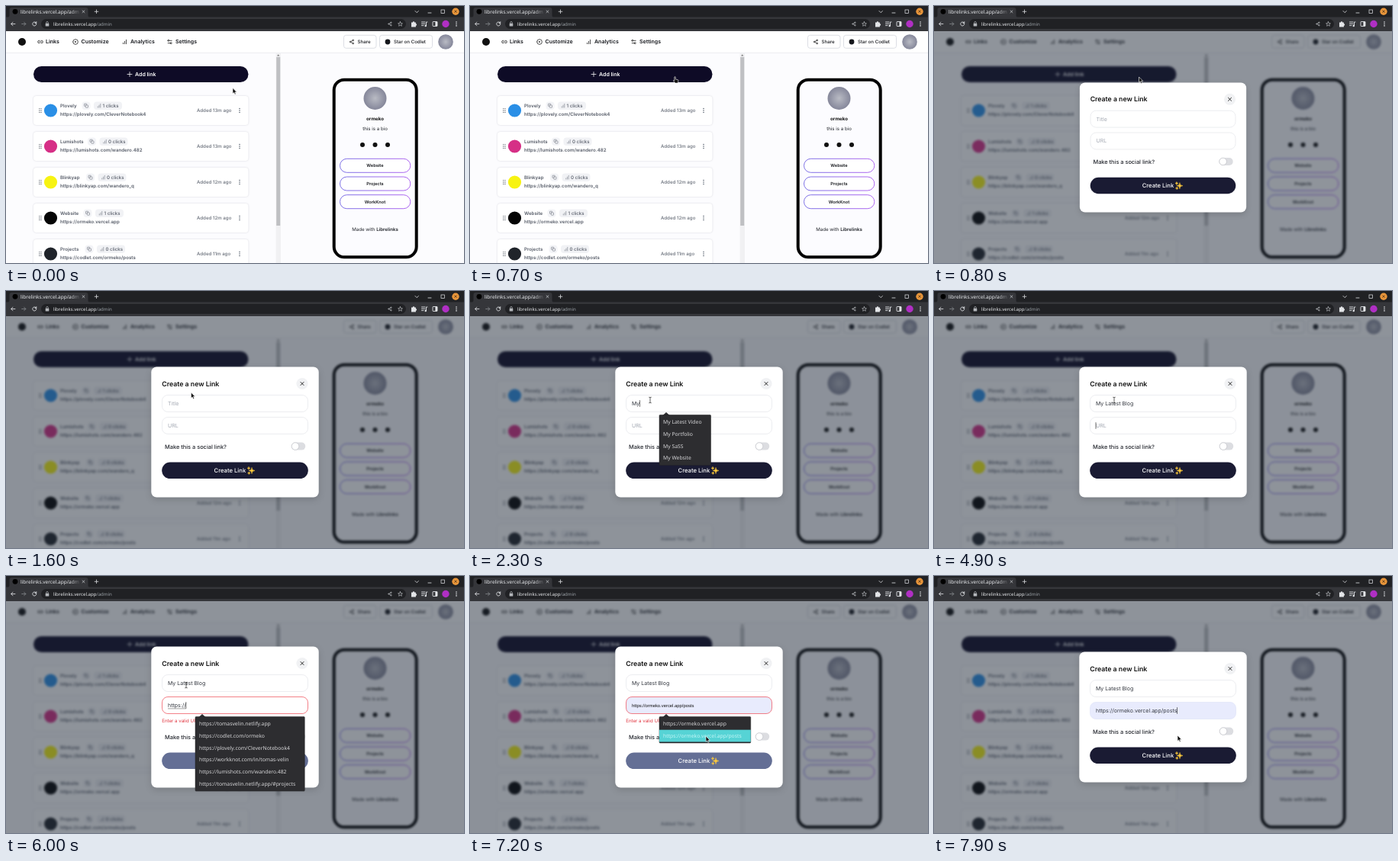
Write an HTML page that moves like this. It is 600 px wide and 337 px high and loops after 8 s.

```html
<!DOCTYPE html>
<html lang="en">
<head>
<meta charset="utf-8">
<title>Link manager</title>
<style>
  html, body { margin: 0; height: 100%; overflow: hidden; background: #fcfcfe; }
  svg { display: block; width: 100vw; height: 100vh; }
  text { font-family: Inter, sans-serif; white-space: pre; text-rendering: geometricPrecision; }
  .ui { font-family: "Noto Sans", sans-serif; }
  .sys { font-family: "Liberation Sans", sans-serif; }
  .card { filter: drop-shadow(0 .6px 1.2px rgba(20, 20, 50, .16)); }
  .panel { filter: drop-shadow(0 3px 4px rgba(0, 0, 0, .14)); }
  .blurred { filter: blur(1.75px); }
</style>
</head>
<body>
<svg viewBox="0 0 600 337" preserveAspectRatio="none">
  <defs>
    <clipPath id="view"><rect y="33" width="600" height="304"/></clipPath>
    <linearGradient id="violet"><stop stop-color="#6f62e2"/><stop offset="1" stop-color="#a657ee"/></linearGradient>
    <linearGradient id="fade" gradientUnits="userSpaceOnUse" x1="84" x2="97">
      <stop stop-color="#e8eaed"/><stop offset="1" stop-color="#e8eaed" stop-opacity=".15"/>
    </linearGradient>
    <radialGradient id="face"><stop stop-color="#b9bbc4"/><stop offset="1" stop-color="#85879a"/></radialGradient>
  </defs>
  <g clip-path="url(#view)">
    <g id="page"></g>
    <rect id="shade" y="33" width="600" height="304" fill="#1f2937"/>
    <g id="modal"></g>
  </g>
  <g id="browser"></g>
  <g id="pointer"></g>
</svg>
<script>
const LOOP = 8000, STEP = 100;
const $ = id => document.getElementById(id);

// Drawing helpers; text is placed by its vertical centre
const rect = (x, y, w, h, r, fill, extra = '') =>
  `<rect x="${x}" y="${y}" width="${w}" height="${h}" rx="${r}" fill="${fill}" ${extra}/>`;
const disc = (x, y, r, fill, extra = '') =>
  `<circle cx="${x}" cy="${y}" r="${r}" fill="${fill}" ${extra}/>`;
const text = (x, cy, size, str, fill, weight = 400, extra = '') =>
  `<text x="${x}" y="${cy + size * .355}" font-size="${size}" font-weight="${weight}" fill="${fill}" ${extra}>${str}</text>`;
const mid = 'text-anchor="middle"';
const line = (d, color, width = .8) =>
  `<path d="${d}" fill="none" stroke="${color}" stroke-width="${width}" stroke-linecap="round" stroke-linejoin="round"/>`;
const icon = (d, cx, cy, size, color = '#111', width = 2) =>
  `<g transform="translate(${cx - size / 2} ${cy - size / 2}) scale(${size / 24})">${line(d, color, width)}</g>`;
const ring = (x, y, r) => `M${x - r} ${y}a${r} ${r} 0 1 0 ${2 * r} 0a${r} ${r} 0 1 0 ${-2 * r} 0`;

const ICON = {
  link: 'M9 17H7A5 5 0 0 1 7 7h2M15 7h2a5 5 0 0 1 0 10h-2M8 12h8',
  target: ring(12, 12, 10) + ring(12, 12, 2),
  bars: 'M12 20V10M18 20V4M6 20v-4',
  sliders: 'M20 7h-9M14 17H5' + ring(17, 17, 3) + ring(7, 7, 3),
  share: ring(18, 5, 3) + ring(6, 12, 3) + ring(18, 19, 3) + 'M8.6 13.5l6.8 4M15.4 6.5l-6.8 4',
  copy: 'M11 9h9a2 2 0 0 1 2 2v9a2 2 0 0 1-2 2h-9a2 2 0 0 1-2-2v-9a2 2 0 0 1 2-2zM5 15H4a2 2 0 0 1-2-2V4a2 2 0 0 1 2-2h9a2 2 0 0 1 2 2v1',
  plus: 'M12 4v16M4 12h16',
  cross: 'M5 5l14 14M19 5L5 19',
  star: 'M12 2l3 7 7 .6-5.3 4.7 1.6 7.2L12 17.6 5.7 21.5l1.6-7.2L2 9.6 9 9z',
  back: 'M21 12H4M11 4l-8 8 8 8',
  next: 'M3 12h17M13 4l8 8-8 8',
  reload: 'M20 12a8 8 0 1 1-2.5-5.8L20 8.5M20 3v5.5h-5.5'
};

const pen = document.createElement('canvas').getContext('2d');
function measure(str, size, font) {
  pen.font = `100px ${font}, sans-serif`;
  return pen.measureText(str).width * size / 100;
}

function drawBrowser() {
  const pale = '#e3e5e8', dim = '#85888c', y = 23.5;
  return rect(0, 0, 600, 15, 0, '#202124') + rect(0, 14.5, 600, 18.5, 0, '#35363a') +
    '<path d="M2 15q2.500 0 2.500-3V5q0-3 3-3h97q3 0 3 3v7q0 3 2.500 3z" fill="#35363a"/>' +
    disc(12, 7.3, 3.4, '#000') +
    text(19, 7.2, 6.5, 'librelinks.vercel.app/adm', 'url(#fade)', 400, 'class="ui"') +
    icon(ICON.cross, 101.5, 7.3, 5, pale, 3) + icon(ICON.plus, 118.5, 7.3, 7, pale, 2.6) +
    line('M536 6.5l2.2 2.2 2.2-2.2M553 9h4', pale) +
    rect(570, 5, 4.4, 4.4, 0, 'none', `stroke="${pale}" stroke-width=".7"`) +
    disc(589, 7.2, 4.7, '#e8953a') + icon(ICON.cross, 589, 7.2, 4.4, '#3b2a16', 4) +
    icon(ICON.back, 9.3, y, 7, pale, 2.8) + icon(ICON.next, 23.3, y, 7, dim, 2.8) +
    icon(ICON.reload, 37.3, y, 7.5, pale, 2.8) +
    rect(46, 17, 478, 13, 6.5, '#202124') +
    rect(51.7, 22.8, 4.6, 3.7, .6, '#b4b7bb') + line('M52.7 22.8v-1a1.3 1.3 0 0 1 2.6 0v1', '#b4b7bb', .7) +
    text(62, y, 6.05, 'librelinks.vercel.app<tspan fill="#9aa0a6">/admin</tspan>', '#e8eaed', 400, 'class="ui"') +
    icon(ICON.share, 503, y, 6, '#c3c6ca', 2.4) + icon(ICON.star, 516.5, y, 7, '#c3c6ca', 2.2) +
    '<path d="M531 21.500h1.800a1.200 1.200 0 1 1 2.400 0h1.700v1.800a1.200 1.200 0 1 1 0 2.400v1.800h-5.900z" fill="#e3e5e8"/>' +
    line('M544.5 21h4.5M544.5 23.3h4.5M544.5 25.6h2.5M550.5 26v-5h1.5', pale, .9) + disc(549.7, 26, 1.2, pale) +
    rect(559, 20.5, 6, 6, .6, 'none', 'stroke="#e3e5e8" stroke-width=".9"') + rect(562.4, 20.5, 2.6, 6, 0, pale) +
    disc(576, y, 4.7, '#b02fc4') + [-2.4, 0, 2.4].map(d => disc(590, y + d, .8, pale)).join('');
}

const CARDS = [
  ['Plovely', 'https://plovely.com/CleverNotebook4', 1, 13, '#2a8fe6', 127],
  ['Lumishots', 'https://lumishots.com/wandero.482', 0, 13, '#d62f86', 134.5],
  ['Blinkyap', 'https://blinkyap.com/wandero_q', 0, 12, '#f7f312', 132.5],
  ['Website', 'https://ormeko.vercel.app', 1, 12, '#050505', 129],
  ['Projects', 'https://codlet.com/ormeko/posts', 0, 11, '#20242a', 131]
];

function drawCard([name, url, clicks, age, color, x], i) {
  const y = 137 + 47 * i, grey = '#565c68';
  let dots = '';
  for (let k = 0; k < 6; k++) dots += disc(43.8 + 2.2 * (k % 2), y - 2.4 + 2.4 * (k >> 1), .65, '#555b66');
  return rect(36, y - 19, 281.5, 38, 4, '#fff', 'class="card"') + dots + disc(58.5, y, 8.6, color) +
    text(71, y - 6.3, 6.15, name, grey, 600) +
    rect(x - 27.5, y - 11.5, 11, 10.5, 4, '#f3f4f7') + icon(ICON.copy, x - 22, y - 6.3, 6, grey, 2) +
    rect(x - 12, y - 11.5, 37, 10.5, 4, '#f1f2f5') + icon(ICON.bars, x - 5, y - 6.3, 7, '#7b818c', 2.2) +
    text(x - .5, y - 6.3, 6.15, clicks + ' clicks', grey, 500) +
    text(71, y + 5, 6.15, url, grey, 600) +
    text(250, y, 6.15, `Added ${age}m ago`, '#686e79', 500) +
    [-2.4, 0, 2.4].map(d => disc(306, y + d, .75, '#4b5563')).join('');
}

function drawPage() {
  const nav = [['link', 45, 52, 'Links'], ['target', 91, 98.5, 'Customize'],
    ['bars', 155.5, 163, 'Analytics'], ['sliders', 214.5, 222, 'Settings']];
  const outline = 'stroke="#d3d6dd" stroke-width=".8"';
  return rect(-10, 20, 620, 330, 0, '#fcfcfe') + rect(-10, 20, 620, 41, 0, '#fff') +
    rect(-10, 61, 620, .6, 0, '#e3e5ea') + disc(21, 47, 5, '#111') +
    nav.map(([k, ix, tx, s]) => icon(ICON[k], ix, 47, 8, '#111', 2.2) + text(tx, 47, 7.03, s, '#15171c', 600)).join('') +
    rect(442.5, 38.3, 42.5, 17, 3, '#fff', outline) + icon(ICON.share, 453, 47, 7, '#111', 2.2) +
    text(460.5, 47, 6.15, 'Share', '#15171c', 500) +
    rect(489.5, 38.3, 69, 17, 3, '#fff', outline) + disc(500, 47, 3.4, '#15171c') +
    text(508, 47, 6.15, 'Star on Codlet', '#15171c', 500) +
    disc(576, 47, 9.8, 'url(#face)') +
    rect(353.5, 61.5, 6.5, 290, 0, '#f1f1f3') + rect(354.2, 67, 5, 221, 0, '#bfc0c3') +
    '<path d="M355 65.500h3.400l-1.700-2z" fill="#777"/>' +
    rect(36, 79, 281.5, 21, 10.5, '#0e0b26') + icon(ICON.plus, 162, 89.5, 9, '#fff', 2) +
    text(169, 89.5, 7.03, 'Add link', '#fff', 600) +
    CARDS.map(drawCard).join('') +
    rect(429.7, 96.7, 108, 232.6, 13.5, '#fcfcff', 'stroke="#000" stroke-width="4"') +
    disc(483.5, 121, 15, 'url(#face)') +
    text(483.5, 147.5, 6.2, 'ormeko', '#111', 700, mid) + text(483.5, 161, 6.15, 'this is a bio', '#1f2228', 400, mid) +
    [467, 483.5, 500].map(x => disc(x, 182, 3, '#111')).join('') +
    ['Website', 'Projects', 'WorkKnot'].map((s, i) =>
      rect(437.5, 200.3 + 23.7 * i, 92.3, 18, 9, '#fff', 'stroke="url(#violet)" stroke-width=".9"') +
      text(483.5, 209.2 + 23.7 * i, 5.7, s, '#16181d', 600, mid)).join('') +
    text(483.5, 293, 6.15, 'Made with <tspan font-weight="600">Librelinks</tspan>', '#1f2228', 400, mid);
}

// Timeline
const OPEN = 750, FOCUS = 1900, TAB = 4600, FIRST = 5100, PICK = 7500;
const TITLES = ['My Latest Video', 'My Portfolio', 'My SaSS', 'My Website'];
const PICKED = 'https://ormeko.vercel.app/posts';
const URLS = ['https://tomasvelin.netlify.app', 'https://codlet.com/ormeko', 'https://plovely.com/CleverNotebook4',
  'https://workknot.com/in/tomas-velin', 'https://lumishots.com/wandero.482',
  'https://tomasvelin.netlify.app/#projects', 'https://ormeko.vercel.app', PICKED];

// Each run: start, ms per character, characters
const TITLE_RUNS = [[2100, 150, 'My'], [2500, 170, ' Latest Blog']];
const URL_RUNS = [[FIRST, 100, 'https://'], [6200, 150, 'or']];

function typed(runs, t) {
  let value = '', last = 0;
  for (const [start, gap, str] of runs) {
    const n = Math.min(str.length, Math.floor((t - start) / gap) + 1);
    if (n > 0) { value += str.slice(0, n); last = start + (n - 1) * gap; }
  }
  return { value, last };
}

// Pointer stops: time, x, y
const STOPS = [[0, 297, 107.5], [100, 297, 107.5], [600, 268.5, 93], [1100, 268.5, 93], [1800, 236, 143],
  [6500, 236, 143], [7000, 309, 210], [PICK, 309, 210], [7800, 319, 209], [LOOP, 319, 209]];

function pointerAt(t) {
  const i = STOPS.findIndex(s => s[0] > t), [t0, x0, y0] = STOPS[i - 1], [t1, x1, y1] = STOPS[i];
  const u = (t - t0) / (t1 - t0), e = u * u * (3 - 2 * u);
  return [x0 + (x1 - x0) * e, y0 + (y1 - y0) * e];
}

function drawPointer(x, y, shape) {
  const art = {
    arrow: '<path d="M0 0v7.400l1.700-1.500 1.200 2.600 1.300-.6-1.200-2.500h2.300z" fill="#111" stroke="#fff" stroke-width=".6"/>',
    hand: '<path d="M-.7 0q.7-.8 1.400 0v3l3 .7q.9.300.7 1.300l-.6 3h-3.600l-2.400-3q0-1 1.500 0z" fill="#111" stroke="#fff" stroke-width=".6"/>',
    beam: line('M-1.3-3.8q1.3 0 1.3.8q0-.8 1.3-.8M0-3v6M-1.3 3.8q1.3 0 1.3-.8q0 .8 1.3.8', '#222', .7)
  };
  return `<g transform="translate(${x} ${y})">${art[shape]}</g>`;
}

const spark = (x, y, r) =>
  `<path d="M${x} ${y - r}Q${x} ${y} ${x + r} ${y}Q${x} ${y} ${x} ${y + r}Q${x} ${y} ${x - r} ${y}Q${x} ${y} ${x} ${y - r}z" fill="#fbc93d" stroke="#fbc93d" stroke-width=".6"/>`;

const PITCH = 15.8;

function drawList(items, top, hover) {
  const w = Math.max(...items.map(s => measure(s, 6.8, '"Noto Sans"'))) + 17;
  return `<path d="M252.5 ${top + .5}l4.5-4 4.5 4z" fill="#2d2d30"/>` +
    rect(248, top, w, 2.8 + PITCH * items.length, 1, '#2d2d30', 'stroke="#202022" stroke-width=".5"') +
    (hover < 0 ? '' : rect(248, top + 1.4 + PITCH * hover, w, PITCH, 0, '#56d3d5')) +
    items.map((s, i) => text(253, top + 9 + PITCH * i, 6.8, s, i === hover ? '#c4f6f6' : '#d6d6d8', 400, 'class="ui"')).join('');
}

function drawModal(t, state) {
  const { title, url, s, items, hover, top } = state;
  const y1 = 147.5 - s, y2 = 176.5 - s, low = s, error = s > 0;
  const done = t >= PICK, preview = hover >= 0;
  const onUrl = t >= TAB, value = onUrl ? url.value : title.value;
  const since = t - Math.max(onUrl ? (done ? PICK : TAB) : FOCUS, onUrl ? url.last : title.last);
  const field = (cy, fill, stroke) =>
    rect(204.5, cy - 11, 191, 22, 7.5, fill, `stroke="${stroke}" stroke-width=".7"`);
  const entry = (cy, str, hint) => text(212, cy, 7.03, str || hint, str ? '#33373f' : '#a3a8b2');

  let out = rect(190.3, 99.5 - s, 219.4, 171 + 2 * s, 7, '#fff', 'class="panel"') +
    text(204.2, 121.5 - s, 8.75, 'Create a new Link', '#111', 600) +
    disc(388, 121.5 - s, 7.6, '#f1f2f4') + icon(ICON.cross, 388, 121.5 - s, 7, '#111', 3) +
    field(y1, '#fff', '#e4e6ea') + entry(y1, title.value, 'Title') +
    field(y2, done || preview ? '#e8ebfd' : '#fff', error ? '#ee4a55' : done ? '#e0e4f8' : '#e4e6ea') +
    (preview ? text(212, y2, 5.86, items[hover], '#111', 400, 'class="sys"') : entry(y2, url.value, 'URL'));

  if (error) {
    out += text(204.2, 189.5, 6.15, 'Enter a valid URL', '#e0343f');
    if (!preview) out += rect(212, y2 + 4.2, measure(url.value, 7.03, 'Inter'), .5, 0, '#444');
  }
  if (t >= FOCUS && !preview && since % 1000 < 500)
    out += rect(211.7 + measure(value, 7.03, 'Inter'), (onUrl ? y2 : y1) - 4.3, .6, 8.6, 0, '#111');

  out += text(208, 204 + low, 7.4, 'Make this a social link?', '#23262d', 500) +
    rect(373.8, 198.6 + low, 18.4, 10, 5, '#dcdde1') +
    disc(379, 203.6 + low, 4.8, '#fff', 'stroke="#b7b9bf" stroke-width=".6"') +
    rect(204.2, 224.5 + low, 191.6, 21.6, 10.8, error ? '#646f95' : '#1a1b33') +
    text(272.5, 235.3 + low, 7.7, 'Create Link', '#fff', 500) +
    spark(322, 235.5 + low, 4) + spark(318, 232.3 + low, 1.9) + spark(318.3, 238.8 + low, 1.7);
  return out + (items.length ? drawList(items, top, hover) : '');
}

function stateAt(t, x, y) {
  const title = typed(TITLE_RUNS, t);
  const url = t >= PICK ? { value: PICKED, last: PICK } : typed(URL_RUNS, t);
  const s = t >= FIRST && t < PICK ? 7 : 0;
  const onUrl = t >= TAB, value = onUrl ? url.value : title.value;
  const items = value && t < PICK ? (onUrl ? URLS : TITLES).filter(o => o.startsWith(value)).slice(0, 6) : [];
  const top = (onUrl ? 191.5 : 162.5) - s;
  const row = Math.floor((y - top - 1.4) / PITCH);
  const hover = onUrl && x > 248 && row >= 0 && row < items.length ? row : -1;
  return { title, url, s, items, top, hover };
}

function render(t) {
  const [x, y] = pointerAt(t), open = t >= OPEN;
  let shape = 'arrow';
  const grow = open ? 1 - Math.pow(1 - Math.min(1, (t - OPEN) / 150), 5) : 0;
  $('page').setAttribute('class', open ? 'blurred' : '');
  $('shade').setAttribute('opacity', Math.min(1, grow * 1.15) * .5);
  if (open) {
    const state = stateAt(t, x, y), k = .96 + .04 * grow;
    $('modal').innerHTML = drawModal(t, state);
    $('modal').setAttribute('transform', `translate(300 ${185 + 3.4 * (1 - grow)}) scale(${k}) translate(-300 -185)`);
    const inField = [147.5, 176.5].some(c => Math.abs(y - c + state.s) < 11);
    if (inField && state.hover < 0 && x > 204 && x < 396) shape = 'beam';
  } else if (y < 100) shape = 'hand';
  $('modal').setAttribute('opacity', Math.min(1, grow * 1.15));
  $('pointer').innerHTML = drawPointer(x, y, shape);
}

$('page').innerHTML = drawPage();
$('browser').innerHTML = drawBrowser();

const begin = performance.now();
let shown = -1;
function tick() {
  const t = Math.floor((performance.now() - begin) % LOOP / STEP) * STEP;
  if (t !== shown) render(shown = t);
  requestAnimationFrame(tick);
}
tick();
</script>
</body>
</html>
```
